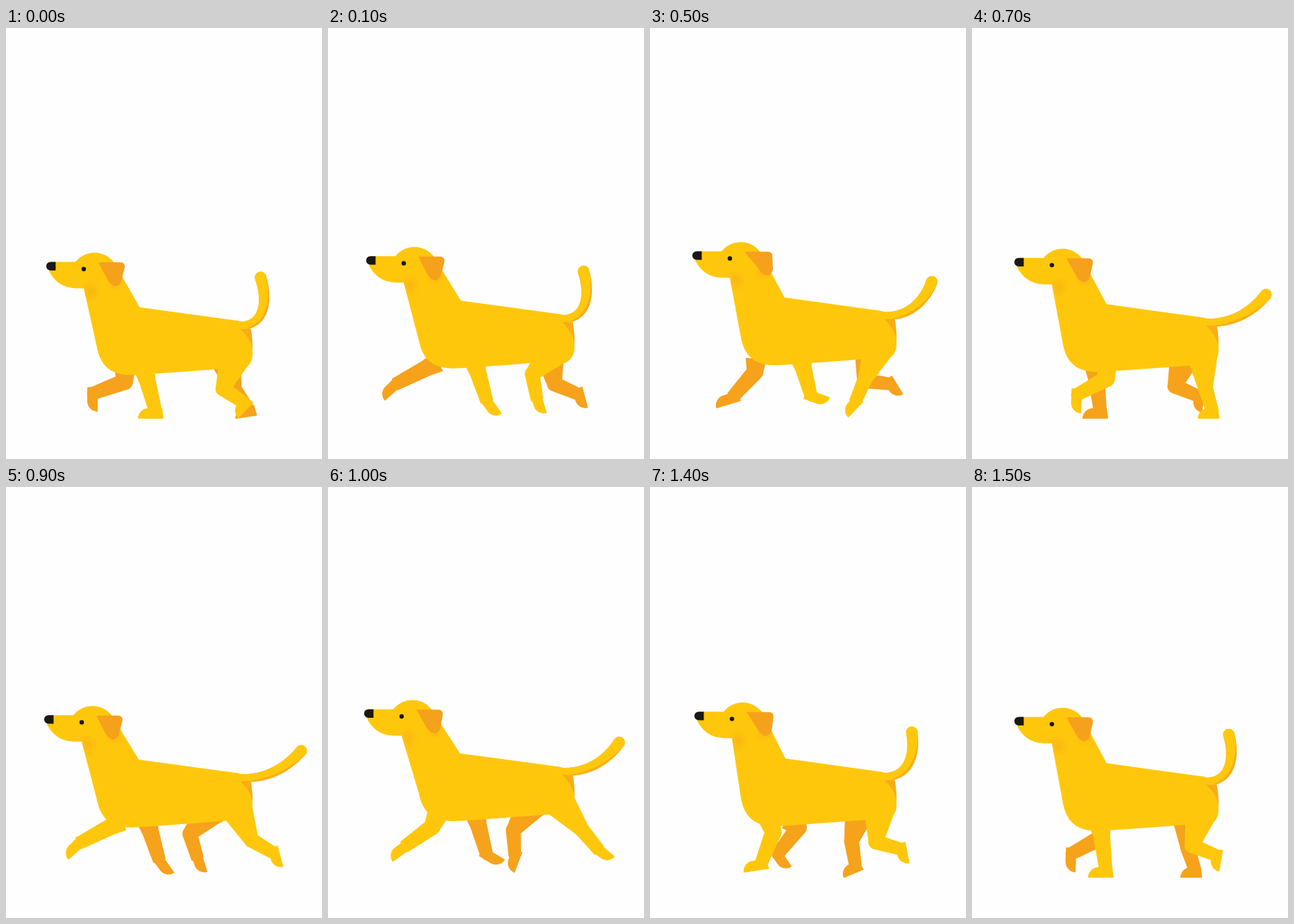
Write an HTML page that moves like this. It is 455 by 620 pixels and loops after 1.6 s.

```html
<!DOCTYPE html>
<html lang="en">
<head>
<meta charset="utf-8">
<title>Walking dog</title>
<style>
  html, body { margin: 0; width: 100%; height: 100%; overflow: hidden; background: #fefefe; }
  svg { display: block; width: 100vw; height: 100vh; }
</style>
</head>
<body>
<svg viewBox="0 0 455 620">
  <defs>
    <radialGradient id="soft">
      <stop offset="0" stop-color="#f6a01a" stop-opacity=".4"/>
      <stop offset="1" stop-color="#f6a01a" stop-opacity="0"/>
    </radialGradient>
    <clipPath id="inside"><path id="clip"/></clipPath>
  </defs>
  <g fill="#f6a21b"><path id="farHind"/><path id="farFore"/></g>
  <path id="tailShade" fill="#f9ae16"/>
  <path id="tail" fill="#ffc80d"/>
  <g fill="#ffc70c"><path id="body"/><path id="nearHind"/><path id="nearFore"/></g>
  <path id="rump" fill="#f8ac18" d="M337 433H352.500Q355 446 355 463Q352 446 337 433Z"/>
  <g clip-path="url(#inside)">
    <g id="shade" fill="url(#soft)">
      <ellipse cx="121" cy="379" rx="16" ry="17"/>
      <circle cx="158" cy="367" r="14"/>
    </g>
  </g>
  <g id="head">
    <path id="ear" fill="#f6a11c"/>
    <path fill="#1b1714" d="M71.500 337V349.300H64Q58 348.500 58 343T64.500 337Z"/>
    <circle cx="112" cy="347.300" r="3.200" fill="#1b1714"/>
  </g>
</svg>
<script>
const STEP = 100, COUNT = 16, TURN = 2 * Math.PI;
const { sin, cos, sqrt, hypot } = Math;
const $ = id => document.getElementById(id);
const draw = (id, d) => $(id).setAttribute('d', d);
const move = (id, x, y) => $(id).setAttribute('transform', `translate(${x} ${y})`);
const wave = (n, peak) => cos(TURN * (n - peak) / COUNT);

// Key points of the paw's path through one cycle: phase, ankle x y, paw angle.
const foreStep = [
  [0, 216, 554, 0], [1, 229, 538, -125], [3, 244, 521, -173],
  [5, 232, 530, -160], [7, 150, 528, -88], [8, 132, 526, -90],
  [9, 104, 513, -42], [13, 126, 532, -17], [15, 193, 554, 0]
];
const hindStep = [
  [0, 344, 540, -46], [1, 301, 535, -107], [3, 287, 528, -31],
  [5, 295, 539, -46], [7, 347, 554, 0], [8, 376, 551, -9],
  [9, 386, 527, -105], [11, 396, 520, -175], [12, 381, 503, -142],
  [15, 352, 530, -80]
];

// Bone lengths and the radius at the hip, joint and ankle; swing moves the hip.
const fore = { step: foreStep, bones: [19, 50], radii: [15, 12, 9.3], y: 490, toe: 26, heel: 11, bend: 1, peak: 3.3 };
const hind = { step: hindStep, bones: [52.5, 38], radii: [24, 10.8, 9], y: 470, toe: 22, heel: 9.5, bend: -1, peak: 11 };
const legs = {
  farHind: { ...hind, hip: 309, swing: 12, dx: -25, shift: 8 },
  farFore: { ...fore, hip: 181, swing: 36, dx: -8, shift: 8 },
  nearHind: { ...hind, hip: 331, swing: 0, dx: 0, shift: 0 },
  nearFore: { ...fore, hip: 189, swing: 36, dx: 0, shift: 0 }
};

function pawAt(step, p) {
  const i = step.findLastIndex(k => k[0] <= p);
  const from = step[i], to = step[i + 1] || step[0];
  const k = (p - from[0]) / ((to[0] || COUNT) - from[0]);
  return from.map((v, j) => v + (to[j] - v) * k).slice(1);
}

const disc = (x, y, r) => `M${x - r} ${y}a${r} ${r} 0 0 0 ${2 * r} 0a${r} ${r} 0 0 0 ${-2 * r} 0Z`;

function segment(x1, y1, r1, x2, y2, r2) {
  const len = hypot(x2 - x1, y2 - y1) || 1;
  const nx = (y1 - y2) / len, ny = (x2 - x1) / len;
  return `M${x1 + nx * r1} ${y1 + ny * r1}L${x2 + nx * r2} ${y2 + ny * r2}` +
    `L${x2 - nx * r2} ${y2 - ny * r2}L${x1 - nx * r1} ${y1 - ny * r1}Z`;
}

function paw(x, y, angle, toe, heel) {
  const c = cos(angle * TURN / 360), s = sin(angle * TURN / 360);
  const at = (u, v) => `${x + u * c - v * s} ${y + u * s + v * c}`;
  return `M${at(-toe, 8)}L${at(heel, 8)}L${at(heel - 2, -7)}L${at(15 - toe, -7)}A15 15 0 0 0 ${at(-toe, 8)}Z`;
}

// Places the joint between hip and ankle; an elbow stays straight behind the shoulder.
function joint(hx, hy, ax, ay, [upper, lower], bend) {
  const dx = ax - hx, dy = ay - hy, len = hypot(dx, dy);
  const straight = len >= upper + lower || (bend > 0 && ax > hx);
  const along = straight ? len * upper / (upper + lower)
    : (upper * upper - lower * lower + len * len) / (2 * len);
  const side = straight ? 0 : bend * sqrt(Math.max(0, upper * upper - along * along));
  return [hx + (dx * along + dy * side) / len, hy + (dy * along - dx * side) / len];
}

function leg(id, n, bob) {
  const { step, bones, radii: [rh, rk, ra], y, toe, heel, bend, peak, hip, swing, dx, shift } = legs[id];
  const p = (n + shift) % COUNT;
  const [px, ay, turn] = pawAt(step, p);
  const ax = px + dx, hx = hip + swing * wave(p, peak), hy = y + bob;
  const [kx, ky] = joint(hx, hy, ax, ay, bones, bend);
  draw(id, (bend < 0 ? disc(hx, hy, rh) : '') +
    segment(hx, hy, rh, kx, ky, rk) + disc(kx, ky, rk) +
    segment(kx, ky, rk, ax, ay, ra) + disc(ax, ay, 7.5) +
    paw(ax, ay, turn, toe, heel));
}

// A tapered curve; trim narrows its middle from the outer side.
function tailShape(w, bob, trim) {
  const px = [335, 366, 390 + 10 * w, 396.5 + 30 * w];
  const py = [428, 431, 411 + 9 * w, 374.5 + 15.5 * w];
  const bezier = (q, t) => q[0] * (1 - t) ** 3 + 3 * q[1] * t * (1 - t) ** 2 + 3 * q[2] * t * t * (1 - t) + q[3] * t ** 3;
  let d = '', last;
  for (let i = 0; i <= 20; i++) {
    const t = i / 20, cut = trim * sin(Math.PI * t);
    const here = [bezier(px, t) - cut * 0.7, bezier(py, t) + bob - cut * 0.7, 5.5 + 2.8 * t - cut];
    if (last) d += segment(...last, ...here);
    d += disc(...here);
    last = here;
  }
  return d;
}

function torso(x, y, d) {
  const h = (u, v) => `${u + x} ${v + y}`;
  const b = (u, v) => `${u} ${v + d}`;
  const path = `M${h(64, 337)}L${h(100, 337)}A35 35 0 0 1 ${h(156, 338.5)}` +
    `L${b(192.5 + x * 0.4, 402)}L${b(335, 421.5)}L${b(352, 434)}Q${b(355, 446)} ${b(355, 470)}` +
    `L${b(330, 489)}L${b(215, 497.5)}L${b(190, 499)}C${b(155, 502)} ${b(137, 490)} ${b(131, 460)}` +
    `L${h(112, 375)}L${h(100, 375)}Q${h(73, 374)} ${h(61, 348)}Z`;
  draw('body', path);
  draw('clip', path);
}

function render(ms) {
  const n = Math.floor(ms / STEP) % COUNT;
  const a = TURN * n / 8; // two strides per cycle
  const bounce = 7.7 * cos(a) + 3.2 * cos(2 * a) + 0.9 * cos(3 * a);
  const x = -24 / TURN * Math.asin(sin(a));
  const y = bounce - 12.3 - 1.8 * sin(a);
  const bob = bounce - 12 - 3.6 * sin(a);
  const ear = 3 - 5 * cos(a) - 0.7 * sin(a) + 1.4 * cos(2 * a);

  for (const id in legs) leg(id, n, bob);
  const w = wave(n, 8.2);
  draw('tailShade', tailShape(w, bob, 0));
  draw('tail', tailShape(w, bob, 2));
  torso(x, y, bob);
  move('rump', 0, bob);
  move('head', x, y);
  move('shade', x, y);
  const q = ear * 0.3;
  draw('ear', `M133 337.500H${165 + q}Q${172 + q} 338.500 ${171 + q} 345L${167 + ear} 363` +
    `Q${165 + ear} 371.500 ${158 + ear} 372Q${152 + ear} 371 ${147 + ear} 363Z`);
}

let start;
function tick(now) {
  if (start === undefined) start = now;
  render(now - start);
  requestAnimationFrame(tick);
}
render(0);
requestAnimationFrame(tick);
</script>
</body>
</html>
```
